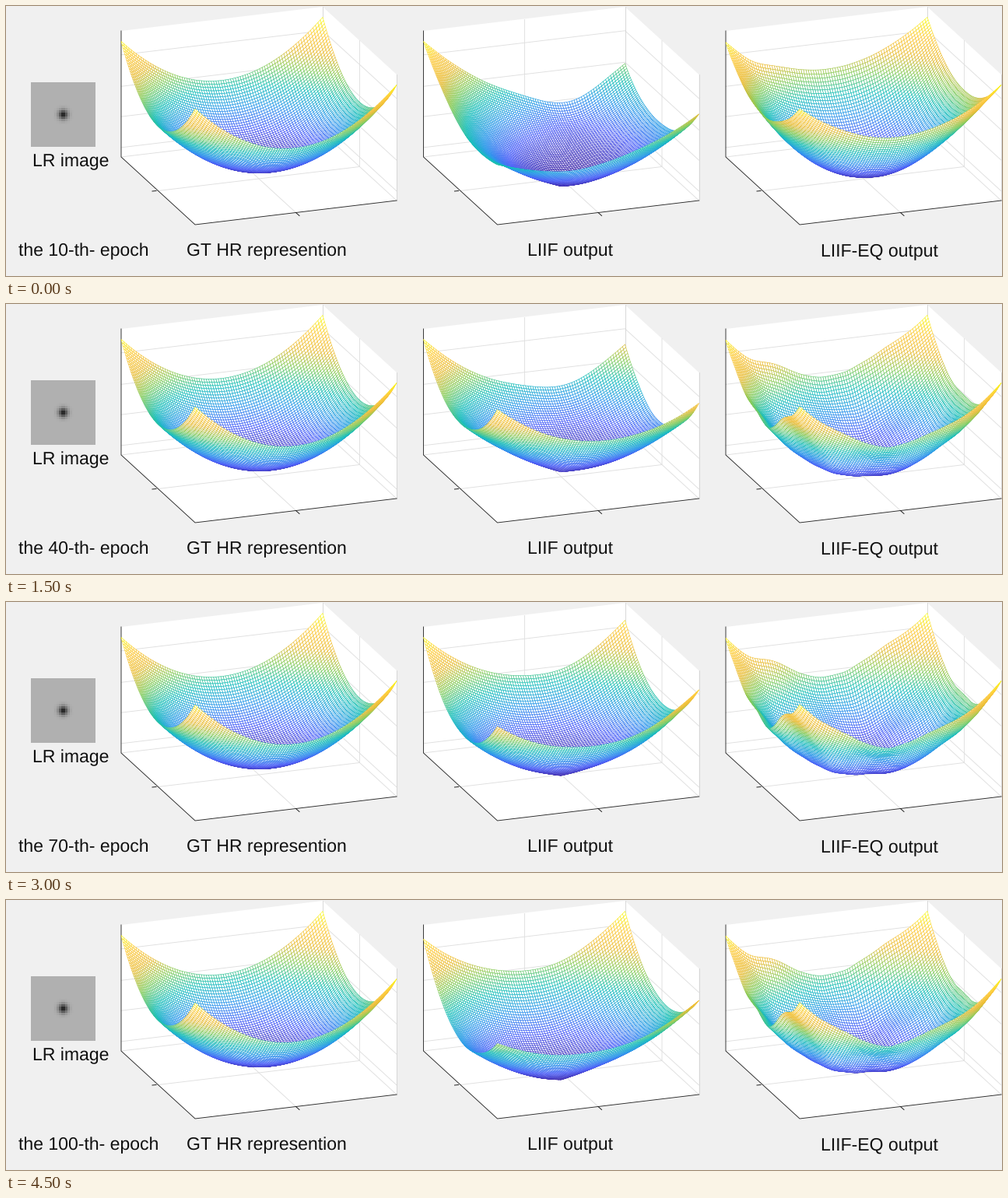
Recreate the animation shown at these times as a matplotlib script. Size 1280x347 px, loop 5 s.

```python
import numpy as np
import matplotlib.pyplot as plt
from matplotlib.animation import FuncAnimation
from matplotlib.collections import PolyCollection
from matplotlib.colors import LinearSegmentedColormap

plt.rcParams["font.family"] = "Liberation Sans"
plt.rcParams["text.hinting"] = "none"
plt.rcParams["text.hinting_factor"] = 1

W, H, DPI = 1280, 347, 100
PX = 72 / DPI
EPOCHS = 10
N = 84
PANELS = (0, 388.5, 777)
PARULA = LinearSegmentedColormap.from_list("parula", [
    "#3e26a8", "#475bf9", "#2797eb", "#13beb9",
    "#81cc59", "#eabb30", "#fec836", "#f9fb15"])

# s runs to the right and t to the back, both from -1 to 1.
s, t = np.meshgrid(np.linspace(-1, 1, N), np.linspace(1, -1, N))
TRUTH = 0.094 + 0.418 * (s ** 2 + t ** 2) - 0.013 * (s * t) ** 2


def quadratic(x):
    return np.array([x * (x - 1) / 2, 1 - x * x, x * (x + 1) / 2])


def sheet(rows):
    """Biquadratic surface through a 3 by 3 grid, back row first."""
    return np.einsum("ij,iab,jab->ab", np.array(rows)[::-1], quadratic(t), quadratic(s))


def bump(s0, t0, width, height):
    return height * np.exp(-((s - s0) ** 2 + (t - t0) ** 2) / width ** 2)


def ripple(seed, low, high, amp):
    """Seeded waves with sharp creases that leave the corners in place."""
    rng = np.random.default_rng(seed)
    z = 0
    for _ in range(7):
        freq, angle, phase = rng.uniform((low, 0, 0), (high, np.pi, 2 * np.pi))
        wave = np.sin(freq * (s * np.cos(angle) + t * np.sin(angle)) + phase)
        z = z + np.arcsin(0.95 * wave)
    return amp * z / 2 * (1 - (s * t) ** 2)


def liif(k):
    """The corners swing over the epochs and pull the edges along."""
    left = np.interp(k, [0, 1, 2, 7, 8, 9], [0, 0.1, 0, 0, 0.1, 0.03])
    back = np.interp(k, [0, 1, 3, 6, 8, 9], [0.35, 0, 0.22, 0.05, 0.17, 0])
    front = np.interp(k, [0, 3, 9], [0.44, 0.02, 0.32])
    right = np.interp(k, [0, 1, 5, 7, 8, 9], [0.23, 0.32, 0, 0.14, 0, 0.17])
    left_edge = np.interp(k, [0, 4, 8], [0, 0, 0.155])
    right_edge = np.interp(k, [0, 3, 5], [0.19, 0.18, 0.04])
    drop = sheet([[left, 0.3 * back - 0.03, back],
                  [left_edge, front / 7 - 0.03, right_edge],
                  [front, 0.4 * front - 0.05, right]])
    keel = -0.05 * np.exp(-np.hypot(s + 0.13, t + 0.35) / 0.3)
    dent = bump(0.45, 1, 0.4, -0.11 * (1 - k / 9))
    return TRUTH - drop + keel + dent + ripple(20 + k, 3, 6, 0.008)


def liif_eq(k):
    """Edges settle while fine folds grow."""
    settle = np.exp(-k / 2)
    grow = min(1, k / 4)
    edges = s ** 2 + t ** 2 - 2 * (s * t) ** 2
    z = TRUTH + 0.09 * settle * edges - 0.05 * (1 - s ** 2) * (1 - t ** 2)
    z += ripple(5, 5, 11, 0.003 + 0.017 * grow)
    z += bump(-0.55, 1, 0.25, 0.07 * grow) + bump(0.5, 1, 0.25, 0.04 * grow)
    return z + bump(-1, -0.62, 0.22, 0.06 * grow) + bump(-0.75, 0.95, 0.2, -0.04)


def project(s, t, z, dx=0):
    x = 325 + 129.5 * s - 47.5 * t + dx
    y = 222 - 15.5 * s - 43.5 * t - 162 * z
    return np.stack(np.broadcast_arrays(x, y), axis=-1)


def mesh_quads(z, dx):
    """Cells ordered from far to near, so nearer ones hide the rest."""
    p = project(s, t, z, dx)[:, ::-1]
    quads = np.stack([p[:-1, :-1], p[:-1, 1:], p[1:, 1:], p[1:, :-1]], axis=2)
    level = ((z - z.min()) / (z.max() - z.min())) ** 1.1
    return quads.reshape(-1, 4, 2), PARULA(level[:, ::-1][:-1, :-1].ravel())


fig = plt.figure(figsize=(W / DPI, H / DPI), dpi=DPI, facecolor="#f0f0f0")
ax = fig.add_axes([0, 0, 1, 1])
ax.axis("off")


def line(points, dx, color):
    xy = np.array([project(*p, dx) for p in points])
    ax.plot(*xy.T, color=color, lw=0.9 * PX, zorder=1)


def draw_box(dx):
    outline = [(-1, 1, 1), (1, 1, 1), (1, -1, 1), (1, -1, 0), (-1, -1, 0), (-1, 1, 0)]
    ax.fill(*np.array([project(*p, dx) for p in outline]).T, color="white", lw=0, zorder=0)
    grey = "#dfdfdf"
    for z in (0.075, 0.32, 0.56, 0.81):
        line([(-1, 1, z), (1, 1, z), (1, -1, z)], dx, grey)
    line([(-1, 0, 0), (1, 0, 0), (1, 0, 1)], dx, grey)
    line([(0, -1, 0), (0, 1, 0)], dx, grey)
    if dx == PANELS[1]:
        line([(0, 1, 0), (0, 1, 1)], dx, grey)
    line([(-1, 1, 0), (1, 1, 0), (1, -1, 0)], dx, grey)
    for corner in ((1, 1), (1, -1)):
        line([(*corner, 0), (*corner, 1)], dx, "#d4d4d4")
    line([(-1, 1, 1), (-1, 1, 0), (-1, -1, 0), (1, -1, 0)], dx, "#262626")
    ax.plot([188 + dx, 193 + dx], [238, 237.5], color="#262626", lw=PX)
    ax.plot([372.5 + dx, 377 + dx], [265.5, 269.5], color="#262626", lw=PX)


def label(x, y, text):
    return ax.text(x, y, text, fontsize=23.5 * PX, color="#101010", va="baseline", zorder=5)


meshes = []
for dx in PANELS:
    draw_box(dx)
    mesh = PolyCollection([], facecolors="white", linewidths=0.62 * PX, zorder=3)
    mesh.set_snap(False)
    ax.add_collection(mesh, autolim=False)
    meshes.append(mesh)

cells = np.arange(30) - 14.5
r2 = cells[:, None] ** 2 + cells[None, :] ** 2
ax.imshow(0.69 * (1 - 0.85 * np.exp(-r2 / 4.4)), cmap="gray", vmin=0, vmax=1,
          extent=(32, 115, 181, 98), interpolation="nearest", aspect="auto")
ax.set(xlim=(0, W), ylim=(H, 0))

label(33.8, 206.5, "LR image")
label(231.5, 321.5, "GT HR represention")
label(670, 321.5, "LIIF output")
label(1047, 321.5, "LIIF-EQ output")
epoch_text = label(15.5, 321.5, "")


def show(mesh, z, dx):
    quads, colors = mesh_quads(z, dx)
    mesh.set_verts(quads)
    mesh.set_edgecolor(colors)


show(meshes[0], TRUTH, PANELS[0])


def update(k):
    show(meshes[1], liif(k), PANELS[1])
    show(meshes[2], liif_eq(k), PANELS[2])
    epoch_text.set_text(f"the {10 * (k + 1)}-th- epoch")
    return [*meshes, epoch_text]


anim = FuncAnimation(fig, update, frames=EPOCHS, interval=500, repeat=True, repeat_delay=0)
plt.show()
```
